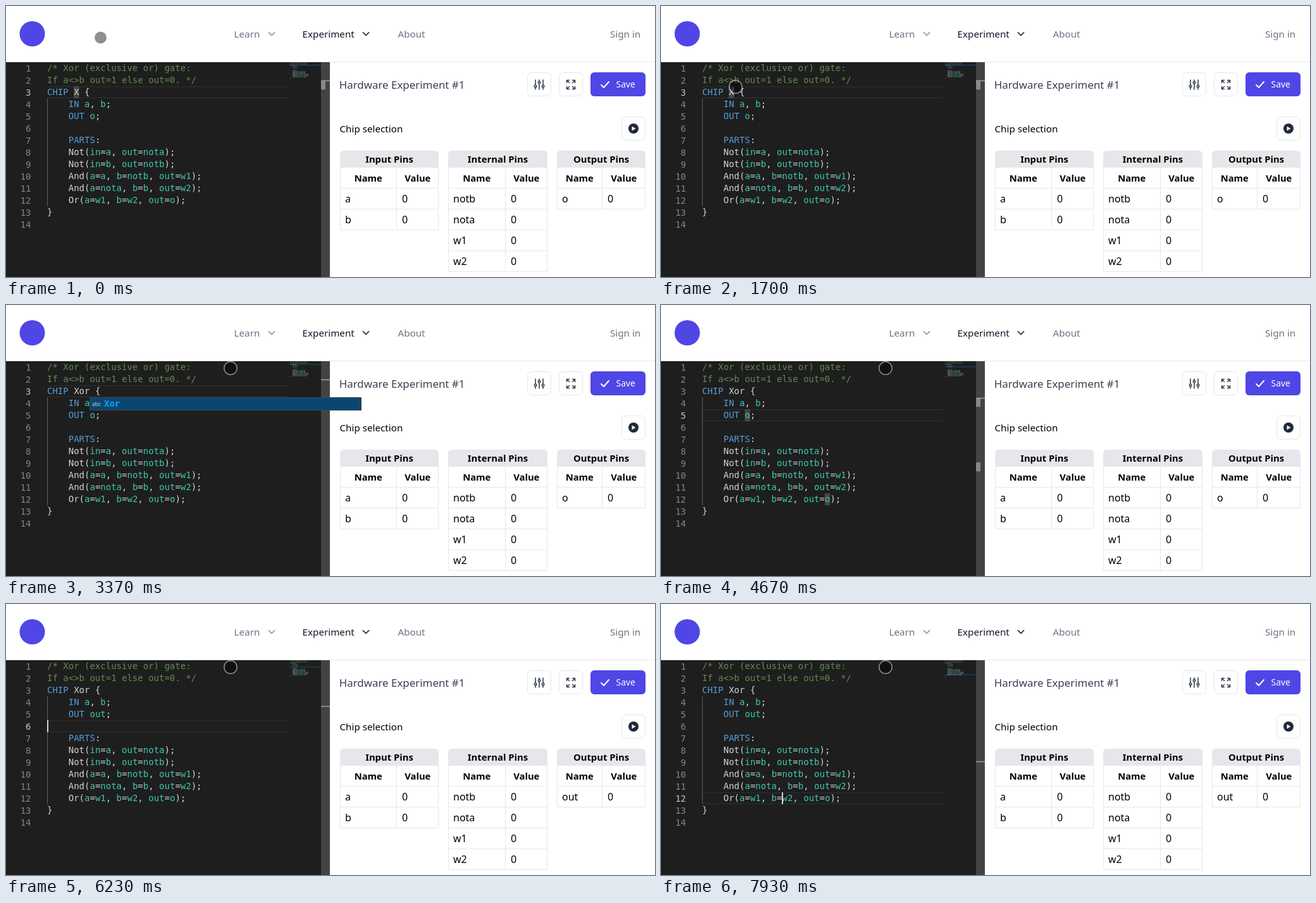
An HTML page for the animation above (8000 ms loop, 1026 by 429 pixels).

```html
<!DOCTYPE html>
<html lang="en">
<head>
<meta charset="utf-8">
<title>Hardware experiment</title>
<style>
  html, body { margin: 0; width: 100%; height: 100%; overflow: hidden; background: #fff; }
  svg { display: block; width: 100%; height: 100%; }
  text { font-family: "Noto Sans", sans-serif; font-size: 15.2px; white-space: pre; }
  .code { font-family: "DejaVu Sans Mono", monospace; font-size: 14px; }
  .bold { font-weight: 700; }
  .head { font-weight: 700; font-size: 14.8px; text-anchor: middle; }
  .cell { font-size: 16px; }
  .line { fill: none; stroke: #e5e7eb; }
  .icon { fill: none; stroke: #374151; stroke-width: 1.6; stroke-linecap: round; stroke-linejoin: round; }
</style>
</head>
<body>
<svg viewBox="0 0 1026 429">
  <rect width="1026" height="429" fill="#fff"/>
  <path class="line" d="M0 88.5H1026"/>
  <circle cx="41.5" cy="44" r="20" fill="#4f46e5"/>
  <g fill="#6b7280">
    <text x="360.6" y="50">Learn</text>
    <text x="468.6" y="50" fill="#111827">Experiment</text>
    <text x="619.5" y="50">About</text>
    <text x="955" y="50">Sign in</text>
  </g>
  <g fill="none" stroke-width="1.8" stroke-linecap="round" stroke-linejoin="round">
    <path d="M415.5 42l4.500 4.500 4.500-4.500" stroke="#9ca3af"/>
    <path d="M564.500 42l4.500 4.500 4.500-4.500" stroke="#374151"/>
  </g>

  <text x="526.700" y="131" style="font-size:16.900px" fill="#374151">Hardware Experiment #1</text>
  <text x="527.500" y="200">Chip selection</text>
  <g class="line">
    <rect x="824.500" y="105.500" width="37" height="37" rx="6"/>
    <rect x="874.500" y="105.500" width="37" height="37" rx="6"/>
    <rect x="973.500" y="175.500" width="37" height="37" rx="6"/>
  </g>
  <path class="icon" d="M837 117v8m0 4v3M843 117v2m0 4v9M849 117v8m0 4v3"/>
  <g class="icon">
    <circle cx="837" cy="127" r="1.700"/><circle cx="843" cy="121" r="1.700"/><circle cx="849" cy="127" r="1.700"/>
  </g>
  <path class="icon" d="M886.500 121.500v-4h4m-4 0l4 4M899.500 121.500v-4h-4m4 0l-4 4M886.500 127.500v4h4m-4 0l4-4M899.500 127.500v4h-4m4 0l-4-4"/>
  <rect x="924" y="105" width="87" height="38" rx="6" fill="#4f46e5"/>
  <path d="M941 125l4 4 8-9" fill="none" stroke="#fff" stroke-width="2" stroke-linecap="round" stroke-linejoin="round"/>
  <text x="964.600" y="129" style="font-size:13.800px" fill="#fff">Save</text>
  <circle cx="992" cy="194" r="8" fill="#1f2937"/>
  <path d="M989.500 190.500v7l6-3.500z" fill="#fff"/>
  <g id="tables"></g>

  <rect y="89" width="512" height="340" fill="#1e1e1e"/>
  <rect x="498" y="89" width="14" height="340" fill="#434343"/>
  <g id="editor"></g>
  <g id="pointer">
    <circle r="9.500" fill="#000" fill-opacity=".44"/>
    <circle r="10.200" fill="none" stroke="#fff" stroke-opacity=".5" stroke-width="1.500"/>
  </g>
</svg>
<script>
const LOOP = 8000, TOP = 89, LEFT = 65, ROW = 19, CHAR = 8.43, RULER_ROW = 14.57;
const byId = id => document.getElementById(id);

// Each step changes part of the editor's state.
const steps = [
  [0, {line: 3, col: 6, caret: 0, chip: 'X', pin: 'o', mark: 'X', menu: []}],
  [1930, {caret: 1}],
  [2430, {caret: 0}],
  [2730, {chip: 'Xo', col: 7, caret: 1, mark: ''}],
  [2870, {chip: 'Xor', col: 8}],
  [2970, {menu: ['Xor']}],
  [3370, {caret: 0}],
  [3530, {menu: [], caret: 1}],
  [4030, {line: 4}],
  [4170, {line: 5}],
  [4420, {mark: 'o'}],
  [4670, {caret: 0}],
  [5070, {pin: 'out', col: 11, mark: '', caret: 1}],
  [5200, {menu: ['out', 'OUT']}],
  [5630, {caret: 0}],
  [5770, {menu: [], col: 12, caret: 1}],
  [6230, {line: 6, col: 0}],
  [6370, {line: 7, col: 10}],
  [6530, {line: 8, col: 12}],
  [6670, {line: 9}],
  [6830, {line: 10}],
  [6970, {line: 11}],
  [7100, {line: 12}],
  [7230, {col: 13}],
  [7500, {mark: 'b'}],
  [7730, {caret: 0}],
  [7800, {col: 14, caret: 1}],
  [7930, {col: 15, mark: ''}]
];

const path = [
  [1250, 149.5, 50], [1500, 107, 137], [1700, 118, 128],
  [1960, 118, 128], [2200, 355, 100]
];

const source = ({chip, pin}) => [
  '/* Xor (exclusive or) gate:', 'If a<>b out=1 else out=0. */',
  `CHIP ${chip} {`, '    IN a, b;', `    OUT ${pin};`, '', '    PARTS:',
  '    Not(in=a, out=nota);', '    Not(in=b, out=notb);',
  '    And(a=a, b=notb, out=w1);', '    And(a=nota, b=b, out=w2);',
  '    Or(a=w1, b=w2, out=o);', '}', ''
];

const escapeText = s => s.replace(/&/g, '&amp;').replace(/</g, '&lt;').replace(/>/g, '&gt;');
const rect = (x, y, w, h, fill, extra = '') =>
  `<rect x="${x}" y="${y}" width="${w}" height="${h}" fill="${fill}" ${extra}/>`;
const text = (x, y, content, cls, extra = '') =>
  `<text x="${x}" y="${y}" class="${cls}" ${extra}>${content}</text>`;
const rowTop = i => TOP + i * ROW;
const colX = c => LEFT + c * CHAR;

function tokens(line, i) {
  if (i < 2) return [[line, '#608b4e']];
  return line.split(/\b/).map(t => [t,
    /^(CHIP|IN|OUT|PARTS)$/.test(t) ? '#569cd6' : /^[a-z]/.test(t) ? '#3dc9b0' : '#d4d4d4']);
}

function minimap(line, i) {
  let out = '', col = 0;
  for (const [token, color] of tokens(line, i)) {
    for (const part of token.matchAll(/\S+/g))
      out += rect(449 + col + part.index, TOP + 2 * i + .5, part[0].length, 1.2, color, 'opacity=".45"');
    col += token.length;
  }
  return out;
}

function menu({menu: items, line, col}) {
  if (!items.length) return '';
  const x = Math.round(colX(col)), y = rowTop(line), h = items.length * ROW;
  return rect(x, y, 430, h + 2, '#454545') + rect(x + 1, y + 1, 428, h, '#252526') +
    rect(x + 1, y + 1, 428, ROW, '#094771') +
    items.map((item, i) =>
      text(x + 4, y + 14 + i * ROW, 'abc', '', 'fill="#d4d4d4" style="font-size:8.5px"') +
      text(x + 23, y + 15 + i * ROW, item, 'code bold', 'fill="#18a3ff"')).join('');
}

function drawEditor(s) {
  const lines = source(s), active = s.line - 1, y = rowTop(active);
  const rulerY = TOP + active * RULER_ROW;
  let out = rect(LEFT, y, 381, 1.5, '#2b2b2b') + rect(LEFT, y + 17.5, 381, 1.5, '#2b2b2b');
  out += rect(449, TOP + 2 * active, 49, 1.5, '#1d3d58');
  lines.forEach((line, i) => {
    if (s.mark) for (const hit of line.matchAll(new RegExp(`\\b${s.mark}\\b`, 'g'))) {
      out += rect(colX(hit.index), rowTop(i), s.mark.length * CHAR, ROW, '#575757', 'opacity=".72"');
      out += rect(498, TOP + i * RULER_ROW, 7, 14, '#888');
    }
    const spans = tokens(line, i).map(([t, c]) => `<tspan fill="${c}">${escapeText(t)}</tspan>`).join('');
    out += text(39.5, rowTop(i) + 15, i + 1, 'code',
      `text-anchor="end" fill="${i === active ? '#c6c6c6' : '#858585'}"`);
    out += text(LEFT, rowTop(i) + 14, spans, 'code') + minimap(line, i);
  });
  out += rect(LEFT, rowTop(3), 1, 9 * ROW, '#606060');
  out += rect(498, rulerY - .5, 14, 1.5, '#a0a0a0');
  if (s.caret) out += rect(Math.floor(colX(s.col)), y, 2, ROW, '#d4d4d4');
  byId('editor').innerHTML = out + menu(s);
}

function table(title, left, split, right, names) {
  const bottom = 288.5 + names.length * 33;
  let out = `<path d="M${left} 256v-21q0-6 6-6H${right - 6}q6 0 6 6v21z" fill="#e5e7eb"/>`;
  out += `<path class="line" d="M${left + .5} 256V${bottom}H${right - .5}V256M${split} 256V${bottom}`;
  for (let y = 288.5; y < bottom; y += 33) out += `M${left} ${y}H${right}`;
  out += '"/>' + text((left + right) / 2, 248, title, 'head') +
    text((left + split) / 2, 278, 'Name', 'head') + text((split + right) / 2, 278, 'Value', 'head');
  names.forEach((name, i) => {
    const y = 311 + i * 33;
    out += text(left + 8, y, name, 'cell') + text(split + 8.5, y, '0', 'cell');
  });
  return out;
}

function drawTables({pin}) {
  byId('tables').innerHTML = table('Input Pins', 528, 617.5, 684, ['a', 'b']) +
    table('Internal Pins', 699, 789.5, 856, ['notb', 'nota', 'w1', 'w2']) +
    table('Output Pins', 871, 942.5, 1011, [pin]);
}

function pointerAt(time) {
  const next = path.findIndex(p => p[0] > time);
  if (next < 1) return (next ? path[path.length - 1] : path[0]).slice(1);
  const [t0, x0, y0] = path[next - 1], [t1, x1, y1] = path[next];
  const u = (time - t0) / (t1 - t0), e = u * u * (3 - 2 * u);
  return [x0 + (x1 - x0) * e, y0 + (y1 - y0) * e];
}

let shown = -1;
function render(now) {
  const time = now % LOOP;
  const count = steps.filter(([at]) => at <= time).length;
  if (count !== shown) {
    shown = count;
    const state = Object.assign({}, ...steps.slice(0, count).map(step => step[1]));
    drawEditor(state);
    drawTables(state);
  }
  byId('pointer').setAttribute('transform', `translate(${pointerAt(time)})`);
}

const start = performance.now();
function tick() {
  render(performance.now() - start);
  requestAnimationFrame(tick);
}
tick();
</script>
</body>
</html>
```
